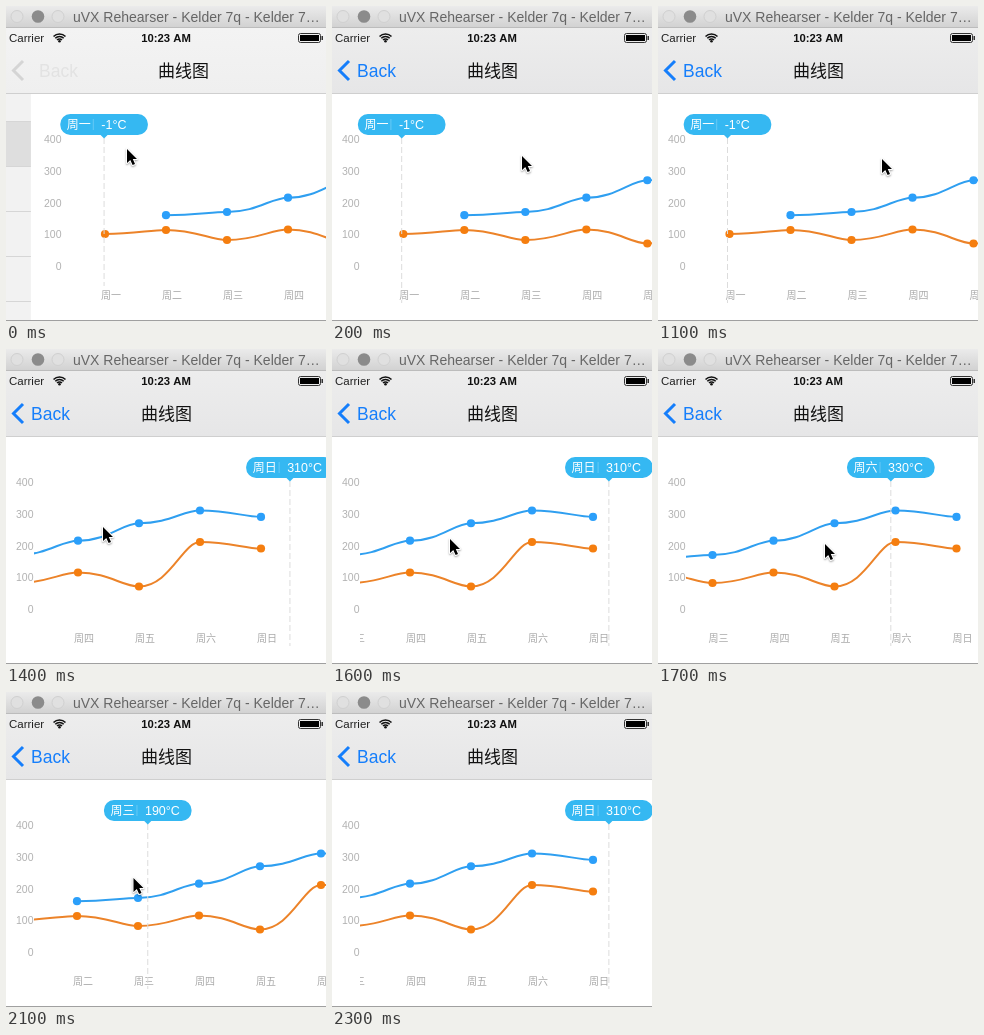
An HTML page with a canvas that plays this animation: 320x315 px, repeating every 2400 ms.

```html
<!DOCTYPE html>
<html lang="zh">
<head>
<meta charset="utf-8">
<style>
html, body { margin: 0; width: 320px; height: 315px; overflow: hidden; background: #fff; }
canvas { display: block; }
</style>
</head>
<body>
<canvas id="stage" width="320" height="315"></canvas>
<script>
const g = document.getElementById('stage').getContext('2d');
const LOOP = 2400, STEP = 100, GAP = 61;
const SANS = '"Liberation Sans", Arial, sans-serif';
const CJK = '"Noto Sans CJK SC", "Noto Sans CJK", sans-serif';
const days = [...'一二三四五六日'].map(d => '周' + d);
const temps = [-1, 180, 190, 235, 290, 330, 310];
const blueY = temps.map(v => 266.3 - v * 0.3175);
const orangeY = [228, 224, 234, 223.5, 237.5, 193, 199.5];

// Keys are [time, value...]; values between keys are linear.
const slideKeys = [[0, 28], [100, 7], [200, 0]];
const scrollKeys = [[0, 71], [300, 71.5], [400, 62], [500, -5], [600, -85], [700, -105],
  [800, -100], [900, -45], [1000, 35], [1100, 71.5], [1200, 68], [1300, -10], [1400, -111],
  [1500, -113], [1600, -105], [1700, -67.5], [1800, 25], [1900, 75.5], [2000, 71.5],
  [2100, 10], [2200, -80], [2300, -105]];
const mouseKeys = [[0, 121, 143], [200, 190, 150], [400, 212, 160], [600, 40, 168], [700, -20, 168],
  [800, 20, 165], [1100, 224, 153], [1200, 220, 160], [1400, 97, 178], [1500, 92, 182],
  [1600, 118, 190], [1700, 167, 195], [1900, 214.5, 195], [2000, 205, 192], [2200, 50, 180],
  [2300, -20, 175]];

function at(keys, t) {
  const i = keys.findIndex(k => k[0] > t);
  if (i < 0) return keys[keys.length - 1].slice(1);
  const a = keys[i - 1], b = keys[i], p = (t - a[0]) / (b[0] - a[0]);
  return a.slice(1).map((v, j) => v + (b[j + 1] - v) * p);
}

function rect(x, y, w, h, fill) {
  g.fillStyle = fill;
  g.fillRect(x, y, w, h);
}

function text(str, x, y, font, fill, align = 'left') {
  g.font = font;
  g.fillStyle = fill;
  g.textAlign = align;
  g.fillText(str, x, y);
}

function disc(x, y, r, fill) {
  g.fillStyle = fill;
  g.beginPath();
  g.arc(x, y, r, 0, 7);
  g.fill();
}

function stroke(color, width) {
  g.strokeStyle = color;
  g.lineWidth = width;
  g.stroke();
}

function shade(y, h, top, bottom) {
  const f = g.createLinearGradient(0, y, 0, y + h);
  f.addColorStop(0, top);
  f.addColorStop(1, bottom);
  rect(0, y, 320, h, f);
}

function windowBar() {
  shade(0, 21, '#ebebeb', '#d2d2d2');
  rect(0, 21, 320, 1, '#bcbcbc');
  for (const x of [11, 52]) {
    disc(x, 10.5, 6, '#e0e0e0');
    stroke('#d0d0d0', 1);
  }
  disc(32, 10.5, 6.3, '#8b8b8b');
  text('uVX Rehearser - Kelder 7q - Kelder 7…', 67, 16, '14px ' + SANS, '#666');
}

function statusBar() {
  text('Carrier', 3, 36, '11.5px ' + SANS, '#222');
  text('10:23 AM', 160, 36, 'bold 11.3px ' + SANS, '#111', 'center');
  for (const r of [3.5, 6, 8.5]) {
    g.beginPath();
    g.arc(53.5, 36.5, r, -2.35, -0.79);
    stroke('#111', 1.6);
  }
  disc(53.5, 35.3, 1.3, '#111');
  g.beginPath();
  g.roundRect(292.5, 27.5, 22, 9, 2);
  stroke('#333', 1);
  rect(294, 29, 19, 6, '#000');
  rect(315.5, 30, 1.5, 4, '#333');
}

function navBar(slide) {
  const moving = slide > 0, p = slide / 28;
  shade(22, 65, moving ? '#f3f3f3' : '#ededed', moving ? '#efefef' : '#e6e6e7');
  rect(0, 87, 320, 1, '#cfcfcf');
  const ink = moving ? `rgba(${p > 0.5 ? '150,150,150' : '21,126,251'},${1 - p * 0.7})` : '#157efb';
  g.beginPath();
  g.moveTo(17, 55);
  g.lineTo(7.5, 64.5);
  g.lineTo(17, 74);
  stroke(ink, 3);
  g.globalAlpha = 1 - p * 0.5;
  text('Back', 25 + p * 8, 71, '17.5px ' + SANS, ink);
  g.globalAlpha = 1;
  text('曲线图', 160.5 + p * 17, 71, '17px ' + CJK, '#111', 'center');
}

function series(ys, first, x0, line, dot) {
  g.beginPath();
  for (let i = first; i < 7; i++) {
    const x = x0 + i * GAP;
    if (i === first) g.moveTo(x, ys[i]);
    else g.bezierCurveTo(x - GAP * 0.5, ys[i - 1], x - GAP * 0.28, ys[i], x, ys[i]);
  }
  stroke(line, 2);
  for (let i = first; i < 7; i++) disc(x0 + i * GAP, ys[i], 4.1, dot);
}

function tooltip(x0, bottom) {
  const x = x0 > 71.5 ? 69.5 + (x0 - 71.5) / 2 : 69.5 + (71.5 - x0) * 1.175;
  const i = Math.max(0, Math.min(6, Math.round((x - x0) / GAP)));
  g.beginPath();
  g.moveTo(x, 132);
  g.lineTo(x, bottom);
  g.setLineDash([6, 3]);
  stroke('#dcdcdc', 1);
  g.setLineDash([]);
  const left = x - 43.8;
  g.fillStyle = '#35b8f2';
  g.beginPath();
  g.roundRect(left, 108, 87.6, 21, 10);
  g.moveTo(x - 4, 128.5);
  g.lineTo(x + 4, 128.5);
  g.lineTo(x, 132.5);
  g.fill();
  text(days[i], left + 6.5, 122.7, '12px ' + CJK, '#fff');
  rect(left + 32.5, 113, 1, 11, '#66c9f5');
  text(temps[i] + '°C', left + 41, 123, '12.5px ' + SANS, '#fff');
}

function chart(slide, x0) {
  if (slide) {
    rect(0, 88, 320, 227, '#f2f2f2');
    rect(0, 115, 320, 45, '#dedede');
    for (const y of [115, 160, 205, 250, 295]) rect(0, y, 320, 1, '#d6d6d6');
  }
  rect(slide * 0.89, 88, 320, 227, '#fff');
  g.save();
  g.translate(slide, 0);
  for (let i = 0; i < 5; i++)
    text(400 - i * 100, 27.5, 137 + i * 31.75, '10.5px ' + SANS, '#b2b2b2', 'right');
  g.save();
  g.beginPath();
  g.rect(28, 88, 320, 227);
  g.clip();
  days.forEach((d, i) => text(d, x0 + i * GAP - 4, 293, '10px ' + CJK, '#a8a8a8'));
  series(orangeY, 0, x0, '#ec8329', '#f57e0f');
  series(blueY, 1, x0, '#2f9ff0', '#2b9ffa');
  g.restore();
  tooltip(x0, slide ? 280 : 297);
  g.restore();
  rect(0, 314, 320, 1, '#a0a0a0');
}

function cursor(x, y) {
  const shape = [[0, 0], [0, 14], [3.3, 11], [5.6, 16], [8, 15], [5.8, 10], [10, 10]];
  g.save();
  g.translate(x, y);
  g.beginPath();
  shape.forEach(p => g.lineTo(...p));
  g.closePath();
  g.lineJoin = 'round';
  g.shadowColor = 'rgba(0,0,0,.35)';
  g.shadowBlur = 2;
  g.shadowOffsetY = 1;
  stroke('#fff', 2);
  g.shadowColor = 'transparent';
  g.fillStyle = '#000';
  g.fill();
  g.restore();
}

const start = performance.now();
function draw() {
  const now = Math.max(0, performance.now() - start) % LOOP;
  const t = Math.floor(now / STEP) * STEP;
  const [slide] = at(slideKeys, t);
  chart(slide, at(scrollKeys, t)[0]);
  navBar(slide);
  windowBar();
  statusBar();
  cursor(...at(mouseKeys, t));
  requestAnimationFrame(draw);
}
draw();
</script>
</body>
</html>
```
